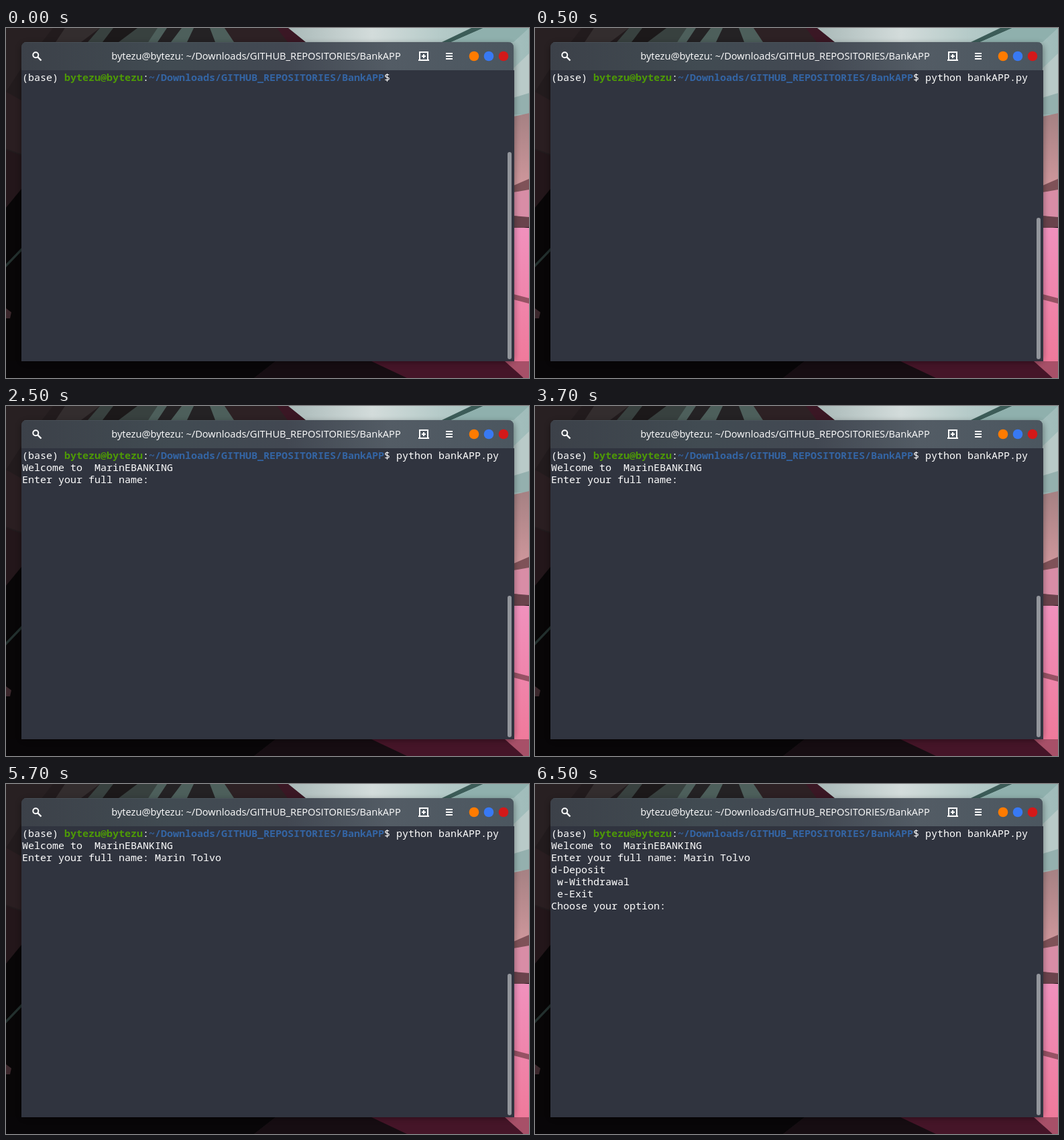
Recreate the animation shown at these times as an HTML page. Size 780x522 px, loop 8 s.

```html
<!DOCTYPE html>
<html lang="en">
<head>
<meta charset="utf-8">
<title>Terminal session</title>
<style>
  html, body { margin: 0; width: 100%; height: 100%; overflow: hidden; background: #080608; }
  svg { display: block; width: 780px; height: 522px; }
  text { white-space: pre; fill: #fff; }
  .title { font: 14.65px "Open Sans", "Noto Sans", sans-serif; text-anchor: middle; }
  .mono { font: 500 15px "Noto Sans Mono", "Liberation Mono", monospace; }
  .user { font-weight: 700; fill: #4e9a06; }
  .path { font-weight: 700; fill: #3465a4; }
</style>
</head>
<body>
<svg viewBox="0 0 780 522" xmlns="http://www.w3.org/2000/svg">
  <defs>
    <linearGradient id="sky">
      <stop offset="0" stop-color="#a9b9b8"/>
      <stop offset=".35" stop-color="#d3dcdb"/>
      <stop offset=".65" stop-color="#b3c9c7"/>
      <stop offset="1" stop-color="#a0bcba"/>
    </linearGradient>
    <linearGradient id="dusk" x2="0" y2="1">
      <stop offset="0" stop-color="#a58183"/>
      <stop offset="1" stop-color="#cf979c"/>
    </linearGradient>
    <linearGradient id="pink" x2="0" y2="1">
      <stop offset="0" stop-color="#f091bd"/>
      <stop offset="1" stop-color="#ef7797"/>
    </linearGradient>
    <linearGradient id="bar">
      <stop offset="0" stop-color="#3c4149"/>
      <stop offset=".3" stop-color="#414b52"/>
      <stop offset=".54" stop-color="#424852"/>
      <stop offset=".75" stop-color="#535c65"/>
      <stop offset="1" stop-color="#4b565f"/>
    </linearGradient>
    <filter id="blur" x="-10%" y="-10%" width="120%" height="120%">
      <feGaussianBlur stdDeviation="5"/>
    </filter>
  </defs>
  <g id="wall"></g>
  <rect x="23" y="24" width="735" height="474" rx="8" fill="#000" opacity=".4" filter="url(#blur)"/>
  <path d="M23 63V29q0-8 8-8H749q8 0 8 8V63z" fill="url(#bar)"/>
  <path d="M27 21.5H753" stroke="#59636a" stroke-opacity=".4"/>
  <rect x="23" y="63" width="735" height="434" fill="#30343f"/>
  <g fill="none" stroke="#fff" stroke-width="2">
    <circle cx="44.3" cy="40.3" r="4"/>
    <path d="M47.2 43.2L52.5 48.5" stroke-width="2.4"/>
    <path d="M617 48V36H629V48M615 48H631M620 42H626M623 39V45"/>
    <path d="M656 38H666M656 42H666M656 46H666"/>
  </g>
  <circle cx="698" cy="42" r="7.3" fill="#ff7b00"/>
  <circle cx="720" cy="42" r="7.3" fill="#3879f4"/>
  <circle cx="742" cy="42" r="7.3" fill="#d41919"/>
  <text id="title" class="title" x="373" y="47"></text>
  <g id="screen"></g>
  <rect id="thumb" x="748" width="6" rx="3" fill="#92959b"/>
</svg>
<script>
const NS = "http://www.w3.org/2000/svg";
const $ = id => document.getElementById(id);
const LOOP = 8000, CELL = 9, ROW = 18, LEFT = 24, BASE = 79;
const HOST = "bytezu@bytezu";
const DIR = "~/Downloads/GITHUB_REPOSITORIES/BankAPP";

// Wallpaper facets around the window
const facets = [
  ["#221b1d", "M0 0H440V522H0z"],
  ["#282022", "M0 0H70L23 60 0 95z"],
  ["#2a1e21", "M0 95L23 108V188L0 180z"],
  ["#23161a", "M0 182L23 190V262L0 268z"],
  ["#080607", "M0 268L23 240V522H0z"],
  ["#23302e", "M0 352L23 328V333L0 357z"],
  ["#3b272c", "M0 418L8 424 6 433H0z"],
  ["#332d2e", "M88 0H140L112 21H74z"],
  ["#38413f", "M140 0H232L212 21H122z"],
  ["#1c191a", "M160 0H196L168 21H144z"],
  ["#4d5f5b", "M226 0H336L348 21H212z"],
  ["#242224", "M240 0H262L246 21H226zM280 0H304L312 21H270z"],
  ["#2d2124", "M326 0H412L424 21H340z"],
  ["#3a1724", "M404 0H422L447 21H420z"],
  ["url(#sky)", "M421 0H780V140H447V21z"],
  ["#3c5c58", "M694 0H712L664 21H650z"],
  ["#8fb0ad", "M712 0H780L757 21H664z"],
  ["#b9cac8", "M780 38L757 60V105L780 98z"],
  ["#94b0ae", "M757 104L780 97V129H757z"],
  ["url(#dusk)", "M757 132L780 127V228L757 236z"],
  ["#7f5258", "M757 235L780 225V242L757 246z"],
  ["#d88da6", "M757 245L780 241V284L757 290z"],
  ["#6a434c", "M757 280L780 282V297L757 300z"],
  ["url(#pink)", "M757 298H780V522H757z"],
  ["#965264", "M757 397L780 403V411L757 405z"],
  ["#080608", "M0 497H402L370 522H0z"],
  ["#160d12", "M402 497H546L600 522H370z"],
  ["#451528", "M545 497H757L772 522H598z"],
  ["#a75068", "M744 497H780V522H772z"]
];

// Each scene starts at its time and lists the output below the prompt
const scenes = [
  { at: 0, top: 185, lines: [] },
  { at: 500, top: 283, lines: [] },
  { at: 2500, top: 283, lines: ["Welcome to  MarinEBANKING", "Enter your full name:"] },
  { at: 4500, top: 283, lines: ["Welcome to  MarinEBANKING", "Enter your full name: Marin Tolvo"] },
  { at: 6500, top: 283, lines: ["Welcome to  MarinEBANKING", "Enter your full name: Marin Tolvo",
    "d-Deposit", " w-Withdrawal", " e-Exit", "Choose your option:"] }
];

function add(parent, tag, attrs, content = "") {
  const el = document.createElementNS(NS, tag);
  for (const key in attrs) el.setAttribute(key, attrs[key]);
  el.textContent = content;
  return parent.appendChild(el);
}

function write(col, row, content, style = "") {
  add($("screen"), "text", { class: "mono " + style, x: LEFT + col * CELL, y: BASE + row * ROW }, content);
}

function draw(scene) {
  $("screen").replaceChildren();
  const runs = [["(base) "], [HOST, "user"], [":"], [DIR, "path"], ["$"]];
  if (scene.at > 0) runs.push([" python bankAPP.py"]);
  let col = 0;
  for (const [content, style] of runs) {
    write(col, 0, content, style);
    col += content.length;
  }
  scene.lines.forEach((line, i) => write(0, i + 1, line));
  $("thumb").setAttribute("y", scene.top);
  $("thumb").setAttribute("height", 494 - scene.top);
}

let shown = null;
function update(now) {
  const t = now % LOOP;
  const scene = scenes.findLast(s => s.at <= t);
  if (scene !== shown) draw(shown = scene);
}

facets.forEach(([fill, d]) => add($("wall"), "path", { fill, d }));
$("title").textContent = `${HOST}: ${DIR}`;

const start = performance.now();
function tick() {
  update(performance.now() - start);
  requestAnimationFrame(tick);
}
tick();
</script>
</body>
</html>
```
